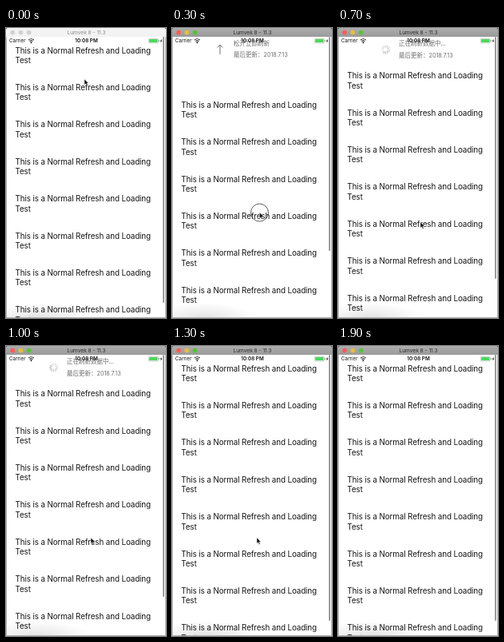
Recreate the animation shown at these times as an HTML page. Size 200 by 363 pixels, loop 2 s.

```html
<!DOCTYPE html>
<html lang="en">
<head>
<meta charset="utf-8">
<title>Pull to refresh</title>
<style>
  html, body { margin: 0; width: 100%; height: 100%; overflow: hidden; background: #fff; }
  svg { display: block; width: 200px; height: 363px; font-family: Inter, "Noto Sans CJK SC", "Noto Sans CJK", sans-serif; }
  .row { font-size: 9.9px; letter-spacing: -.135px; fill: #161616; }
  .header { font-size: 7.5px; fill: #6c6c6c; font-family: "Noto Sans CJK SC", "Noto Sans CJK", sans-serif; }
  .latin { font-family: Inter, sans-serif; font-size: 7.2px; }
  .status { font-size: 6.3px; fill: #111; }
  .title { font-size: 6.6px; text-anchor: middle; }
</style>
</head>
<body>
<svg viewBox="0 0 200 363">
  <defs>
    <linearGradient id="chrome" x2="0" y2="1">
      <stop stop-color="#adadad"/><stop offset="1" stop-color="#9a9a9a"/>
    </linearGradient>
    <radialGradient id="shade">
      <stop stop-color="#e2e2e2"/><stop offset="1" stop-color="#e2e2e2" stop-opacity="0"/>
    </radialGradient>
    <clipPath id="screen"><rect x="1" y="11" width="198" height="352"/></clipPath>
  </defs>
  <rect width="200" height="363" fill="#fff"/>

  <g clip-path="url(#screen)">
    <g id="header" class="header">
      <text id="hint" y="22"></text>
      <text id="updated" y="35.5">最后更新：<tspan class="latin">2018.7.13</tspan></text>
      <path id="arrow" d="M60 33V21M56.8 24.6L60 21l3.2 3.6" fill="none" stroke="#666" stroke-width=".9"/>
      <g id="spinner" stroke-width=".9" stroke-linecap="round"></g>
    </g>
    <g id="list"><rect y="11" width="200" height="400" fill="#fff"/></g>
    <ellipse cx="40" cy="364" rx="65" ry="20" fill="url(#shade)" style="mix-blend-mode: multiply"/>
    <rect id="scrollbar" x="196.1" y="11" width="1.6" rx=".8" fill="#858585"/>
  </g>

  <g class="status">
    <text x="4" y="18.4">Carrier</text>
    <g fill="none" stroke="#111" stroke-width="1.1">
      <path d="M28.2 15.1a4.7 4.7 0 0 1 6.6 0M29.6 16.7a2.7 2.7 0 0 1 3.8 0"/>
      <circle cx="31.5" cy="18.2" r=".4"/>
    </g>
    <text x="100.5" y="18.4" text-anchor="middle" font-weight="600">10:08 PM</text>
    <rect x="178.3" y="13.3" width="12" height="5.6" rx="1.2" fill="#fff" stroke="#999" stroke-width=".5"/>
    <rect x="179.1" y="14.1" width="10.4" height="4" rx=".6" fill="#4bd95b"/>
    <path d="M191.3 15v2.2" stroke="#777" stroke-width=".7"/>
    <path d="M194.6 13.4l-1.9 3h1.2l-.5 2.4 1.9-3.1h-1.2z"/>
  </g>

  <rect id="bar" width="200" height="11"/>
  <g id="lights"></g>
  <text id="title" class="title" x="100.5" y="8">Lumvek 8 - 11.3</text>
  <path d="M.5 11V363M199.5 11V363" stroke="#b0b0b0"/>
  <path d="M0 362.5H200" stroke="#b0b0b0"/>
  <path d="M0 0h2.5A2.5 2.5 0 0 0 0 2.5zM200 0h-2.5a2.5 2.5 0 0 1 2.5 2.5z" fill="#555"/>

  <g id="cursor">
    <circle id="touch" r="11" fill="none" stroke="#333" stroke-width=".8"/>
    <path d="M0 0v7.2l1.7-1.5 1.2 2.7 1.2-.5-1.2-2.7h2.3z" fill="#111" stroke="#fff" stroke-width=".4"/>
  </g>
</svg>
<script>
const LOOP = 2000, STEP = 100;
const ROW_HEIGHT = 46.4, SCREEN_HEIGHT = 352, HEADER_HEIGHT = 31.5;
const PRESS_Y = 77, PRESS = 100, RELEASE = 450, DONE = 1300, CURSOR_GONE = 1900;
const LIGHTS = ['#fb5e58', '#e6bd3d', '#58c13b'];
const cursorPath = [[0, 98, 64], [100, 100, 77], [300, 109.5, 231], [400, 107, 276],
  [500, 103, 255], [700, 103, 243], [1000, 106, 240], [2000, 106, 240]];

const $ = id => document.getElementById(id);
const show = (id, on) => $(id).setAttribute('visibility', on ? 'visible' : 'hidden');

function add(parent, tag, attrs, text = '') {
  const node = document.createElementNS('http://www.w3.org/2000/svg', tag);
  for (const key in attrs) node.setAttribute(key, attrs[key]);
  node.textContent = text;
  return $(parent).appendChild(node);
}

for (let i = 0; i < 8; i++) {
  const y = 31.6 + i * ROW_HEIGHT;
  add('list', 'text', { class: 'row', x: 11.5, y }, 'This is a Normal Refresh and Loading');
  add('list', 'text', { class: 'row', x: 11.5, y: y + 12.4 }, 'Test');
}
const lights = LIGHTS.map((_, i) => add('lights', 'circle', { cx: 8.3 + i * 10.2, cy: 5.6, r: 2.9 }));
const spokes = Array.from({ length: 12 }, (_, i) => add('spinner', 'path',
  { d: 'M0-3v-2.2', transform: `translate(59.6 27) rotate(${i * 30})` }));

function cursorAt(t) {
  const i = cursorPath.findIndex(key => key[0] > t);
  const [t0, x0, y0] = cursorPath[i - 1], [t1, x1, y1] = cursorPath[i];
  const p = (t - t0) / (t1 - t0);
  return [x0 + (x1 - x0) * p, y0 + (y1 - y0) * p];
}

// Scroll view resistance beyond its edge
const rubberBand = d => SCREEN_HEIGHT * (1 - 1 / (d * .55 / SCREEN_HEIGHT + 1));

function offsetAt(t, y) {
  if (t < PRESS || t >= DONE) return 0;
  if (t < RELEASE) return rubberBand(Math.max(0, y - PRESS_Y));
  const p = Math.min(1, Math.max(0, (t - 500) / 200));
  return 84.4 + (HEADER_HEIGHT - 84.4) * p * p * (3 - 2 * p);
}

function draw(t) {
  const [x, y] = cursorAt(t);
  const offset = offsetAt(t, y);
  const active = t >= PRESS, pressed = active && t < RELEASE;
  const loading = t >= RELEASE && t < DONE;

  $('bar').setAttribute('fill', active ? 'url(#chrome)' : '#f3f3f3');
  $('title').setAttribute('fill', active ? '#2c2c2c' : '#8b8b8b');
  lights.forEach((light, i) => light.setAttribute('fill', active ? LIGHTS[i] : '#d2d2d2'));

  $('list').setAttribute('transform', `translate(0 ${offset})`);
  $('scrollbar').setAttribute('height', 333 - offset * .95);

  $('hint').textContent = loading ? '正在刷新数据中...' : '松开立即刷新';
  $('hint').setAttribute('x', loading ? 76 : 77);
  $('updated').setAttribute('x', loading ? 76 : 77);
  $('updated').setAttribute('y', loading ? 36.7 : 35.5);
  show('header', offset > 0);
  show('arrow', offset > 0 && !loading);
  show('spinner', loading);
  const head = t / STEP;
  spokes.forEach((spoke, i) => {
    const age = (head - i + 48) % 12;
    const shade = Math.round(165 + age * 5);
    spoke.setAttribute('stroke', `rgb(${shade},${shade},${shade})`);
  });

  $('cursor').setAttribute('transform', `translate(${x} ${y})`);
  show('cursor', t < CURSOR_GONE);
  show('touch', pressed);
}

const start = performance.now();
function tick() {
  const t = (performance.now() - start) % LOOP;
  draw(Math.floor(t / STEP) * STEP);
  requestAnimationFrame(tick);
}
tick();
</script>
</body>
</html>
```
